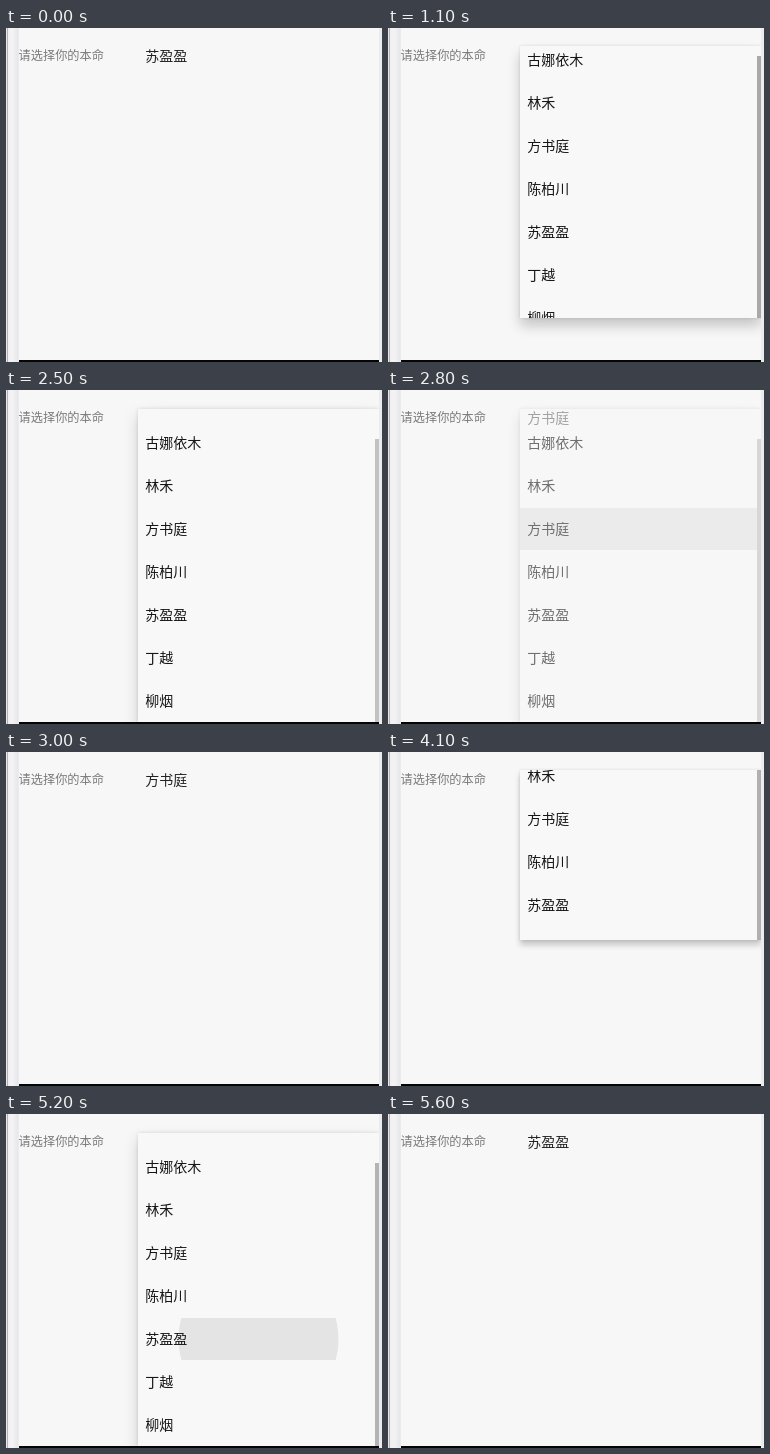
Write an HTML page that moves like this. It is 376 px wide and 334 px high and loops after 6700 ms.

```html
<!DOCTYPE html>
<html lang="zh-CN">
<head>
<meta charset="utf-8">
<title>下拉选择</title>
<style>
  html, body { margin: 0; width: 100%; height: 100%; overflow: hidden; }
  body {
    position: relative;
    background: #ececee;
    font: 14px "Noto Sans CJK SC", "Noto Sans CJK JP", "Noto Sans CJK", sans-serif;
    color: #161616;
  }
  .edge {
    position: absolute; left: 0; top: 0; width: 13px; height: 334px;
    background: linear-gradient(90deg, #e9e7e9 1px, #b8b0b7 1px 2px, #f0eef0 2px, #f4f3f5 6px, #e7e7eb 12px, #eeeef1 13px);
  }
  .line { position: absolute; left: 13px; top: 332px; width: 360px; height: 2px; background: #050505; }
  .screen {
    position: absolute; left: 13px; top: 0; width: 360px; height: 332px;
    overflow: hidden; background: #f7f7f7;
  }
  .screen > span { position: absolute; top: 17px; line-height: 20px; white-space: nowrap; }
  .label { left: -.4px; font-size: 12.2px; color: #7b7b7b; }
  .value { left: 126.3px; color: #222; animation: first 6.7s step-end infinite; }
  .value.alt { animation-name: second; }

  /* --off: content shift while the popup unfolds; its height follows at twice the rate */
  .popup {
    --off: 0px; --top: 18px; --r: 0px; --row: 0; --bar: #b4b4b4;
    position: absolute; left: 119px; top: var(--top); width: 241px;
    height: calc(332px - var(--top) + 2 * var(--off));
    background: #f8f8f8;
    opacity: 0;
    animation: popup 6.7s step-end infinite;
  }
  .clip { position: absolute; inset: 0; overflow: hidden; }
  .list {
    position: absolute; left: 0; top: calc(31px + var(--off) - var(--top));
    width: 100%; margin: 0; padding: 0; list-style: none;
  }
  .list li { position: relative; height: 43px; line-height: 43px; padding-left: 7.3px; }
  .ripple {
    position: absolute; left: 0; top: calc(var(--row) * 43px + 1px); width: 100%; height: 42px;
    background: #e4e4e4; clip-path: circle(var(--r) at 120.5px 21px);
  }
  .bar { position: absolute; right: 0; top: 18px; width: 4px; height: 400px; background: var(--bar); }

  @keyframes first  { 0% { opacity: 1 } 37.31% { opacity: 0 } 77.61%, 100% { opacity: 1 } }
  @keyframes second { 0% { opacity: 0 } 37.31% { opacity: 1 } 77.61%, 100% { opacity: 0 } }

  @keyframes popup {
    0% { opacity: 0; --off: 0px; --top: 18px; --r: 0px; --row: 2; --bar: #a9a9a9; box-shadow: none }
    16.41% { opacity: 1; --off: -21px; --top: 18px; --bar: #a9a9a9; box-shadow: 0 8px 12px rgba(0,0,0,.2), 0 0 3px rgba(0,0,0,.12) }
    17.9% { --off: -1px; --top: 19px; box-shadow: 0 7px 14px rgba(0,0,0,.17), 0 0 4px rgba(0,0,0,.12) }
    19.4% { --off: 0px; --top: 19px; --bar: #c2c2c2; box-shadow: 0 7px 14px rgba(0,0,0,.17), 0 0 4px rgba(0,0,0,.12) }
    37.31% { opacity: 1; --r: 0px }
    38.8% { --r: 80px }
    40.29% { opacity: .95; --r: 126px }
    41.79% { opacity: .6 }
    43.28% { opacity: .2 }
    44.77% { opacity: 0; --r: 0px; --row: 4 }
    61.19% { opacity: 1; --off: -72px; --top: 18px; --bar: #b0b0b0; box-shadow: 0 5px 6px rgba(0,0,0,.2), 0 0 3px rgba(0,0,0,.12) }
    62.68% { --off: -7px; --top: 19px; box-shadow: 0 7px 13px rgba(0,0,0,.18), 0 0 4px rgba(0,0,0,.12) }
    64.17% { --off: 0px; --top: 19px; --bar: #b4b4b4; box-shadow: 0 7px 14px rgba(0,0,0,.17), 0 0 4px rgba(0,0,0,.12) }
    77.61% { opacity: 1; --r: 80px }
    79.1% { opacity: .95; --r: 126px }
    80.59% { opacity: .6 }
    82.08% { opacity: .2 }
    83.58%, 100% { opacity: 0; --off: 0px; --top: 18px; --r: 0px; --row: 4; --bar: #b4b4b4; box-shadow: none }
  }
</style>
</head>
<body>
  <div class="edge"></div>
  <div class="line"></div>
  <div class="screen">
    <span class="label">请选择你的本命</span>
    <span class="value">苏盈盈</span>
    <span class="value alt">方书庭</span>
    <div class="popup">
      <div class="clip">
        <ul class="list">
          <div class="ripple"></div>
          <li>古娜依木</li>
          <li>林禾</li>
          <li>方书庭</li>
          <li>陈柏川</li>
          <li>苏盈盈</li>
          <li>丁越</li>
          <li>柳烟</li>
          <div class="bar"></div>
        </ul>
      </div>
    </div>
  </div>
</body>
</html>
```
